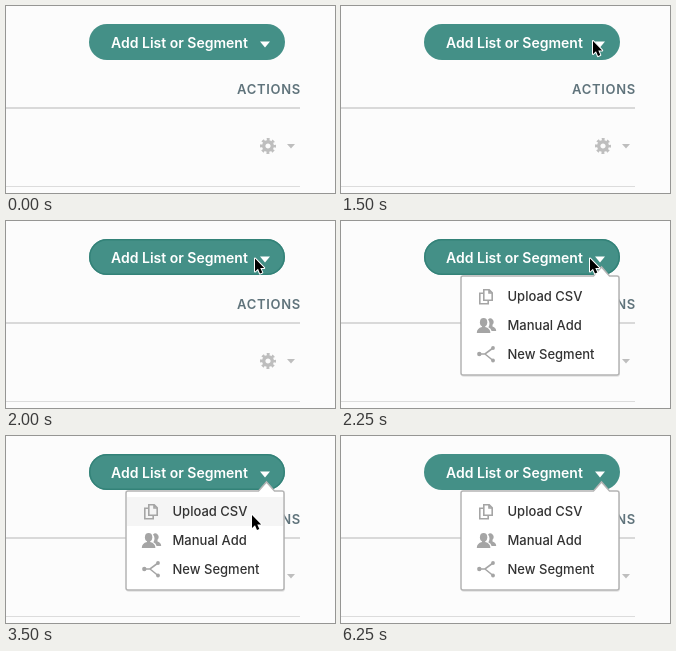
Write an HTML page that moves like this. It is 329 px wide and 187 px high and loops after 6.5 s.

```html
<!DOCTYPE html>
<html lang="en">
<head>
<meta charset="utf-8">
<title>Add List or Segment menu</title>
<style>
  html, body { margin: 0; width: 100%; height: 100%; overflow: hidden; background: #fcfcfc; }
  svg { display: block; width: 100vw; height: 100vh; font-family: Inter, "Open Sans", sans-serif; }
  .label { font-size: 14px; font-weight: 600; fill: #fff; }
  .heading { font-size: 13px; font-weight: 600; letter-spacing: .7px; fill: #5f737b; }
  .items { font-size: 13px; font-weight: 500; fill: #333; }
  .icons { fill: none; stroke: #a5a5a5; stroke-width: 1.6; }
  .icons .solid { fill: #a5a5a5; stroke: none; }
</style>
</head>
<body>
<svg viewBox="0 0 329 187">
  <rect width="329" height="187" fill="#fcfcfc"/>

  <!-- Table -->
  <text class="heading" x="231" y="88">ACTIONS</text>
  <path d="M0 102H294" stroke="#d9d9d9" stroke-width="2"/>
  <path d="M0 180.5H294" stroke="#dcdcdc"/>
  <g fill="none" stroke="#bebebe" transform="translate(262 140)">
    <circle r="4.3" stroke-width="3.4"/>
    <circle r="6.6" stroke-width="2.8" stroke-dasharray="2.8 2.384" stroke-dashoffset="1.4"/>
  </g>
  <path d="M281 138H289L285 142.5Z" fill="#bebebe"/>

  <!-- Button -->
  <rect x="83" y="18" width="196" height="36" rx="18" fill="#449087"/>
  <rect id="ring" x="83.75" y="18.75" width="194.5" height="34.5" rx="17.25" fill="none" stroke="#2f7f75" stroke-width="1.5"/>
  <text class="label" x="105" y="42">Add List or Segment</text>
  <path d="M254 35.5H264L259 41.5Z" fill="#fff"/>

  <!-- Dropdown -->
  <g id="menu">
    <rect x="120" y="56" width="159" height="100" rx="3" fill="#000" opacity=".08"/>
    <path d="M122 55H252.5L260.5 46L268.5 55H276Q278 55 278 57V152Q278 154 276 154H122Q120 154 120 152V57Q120 55 122 55Z"
          fill="#fff" stroke="#b4b4b4" stroke-width="1.5"/>
    <rect id="highlight" x="121" y="61" width="156" height="29" fill="#f5f5f5"/>
    <g class="icons">
      <path d="M142.8 68.8H148.2L151.2 71.8V79.2H142.8ZM148 69V72H151M142 72.3H138.8V82.7H147.2V80"/>
      <g class="solid">
        <path d="M147 98.5A3.2 3.6 0 1 1 151.5 103.8V105.4Q155.2 106.4 155.2 110H150.6Q150 107.5 147.4 106.2Q149.8 102 147 98.5Z"/>
        <ellipse cx="142.6" cy="101.3" rx="3.7" ry="4.3"/>
        <path d="M141 104H144.2V106Q149.4 107.3 149.4 112H135.8Q135.8 107.3 141 106Z"/>
        <circle cx="138.3" cy="133" r="2.2"/>
        <circle cx="152" cy="127" r="1.9"/>
        <circle cx="152" cy="139.5" r="1.9"/>
      </g>
      <path d="M138 133H144L152 127M144 133L152 139.5"/>
    </g>
    <g class="items">
      <text x="166.5" y="80">Upload CSV</text>
      <text x="166.5" y="109">Manual Add</text>
      <text x="166.5" y="138">New Segment</text>
    </g>
  </g>

  <path id="cursor" d="M1 1.5V14.5L4 11.8L6 16.6L8.3 15.6L6.3 11H10.2Z"
        fill="#000" stroke="#fff" stroke-width="2" stroke-linejoin="round" paint-order="stroke"/>
</svg>
<script>
  const LOOP = 6500;
  // Pointer stops: [start ms, x, y]; a stop without a position hides it.
  const stops = [
    [0], [1000, 258, -7], [1250, 251, 33], [1500, 251, 33.5], [1750, 248, 37],
    [2000, 248, 36], [3000, 246, 57.5], [3250, 245, 76.5], [3500, 245, 77.5],
    [5000, 306, 73], [5250]
  ];
  const [ring, menu, highlight, cursor] =
    ["ring", "menu", "highlight", "cursor"].map(id => document.getElementById(id));
  const show = (node, visible) => node.setAttribute("visibility", visible ? "inherit" : "hidden");
  const within = (t, from, to) => t >= from && t < to;

  function draw(now) {
    const t = now % LOOP;
    const [, x, y] = stops.findLast(stop => t >= stop[0]);
    show(cursor, x !== undefined);
    if (x !== undefined) cursor.setAttribute("transform", `translate(${x} ${y})`);

    show(menu, t >= 2250);
    show(highlight, within(t, 3250, 5000));
    ring.setAttribute("opacity", within(t, 2000, 6250) ? 0.8 : within(t, 1750, 2000) ? 0.4 : 0);
    requestAnimationFrame(draw);
  }
  draw(0);
</script>
</body>
</html>
```
